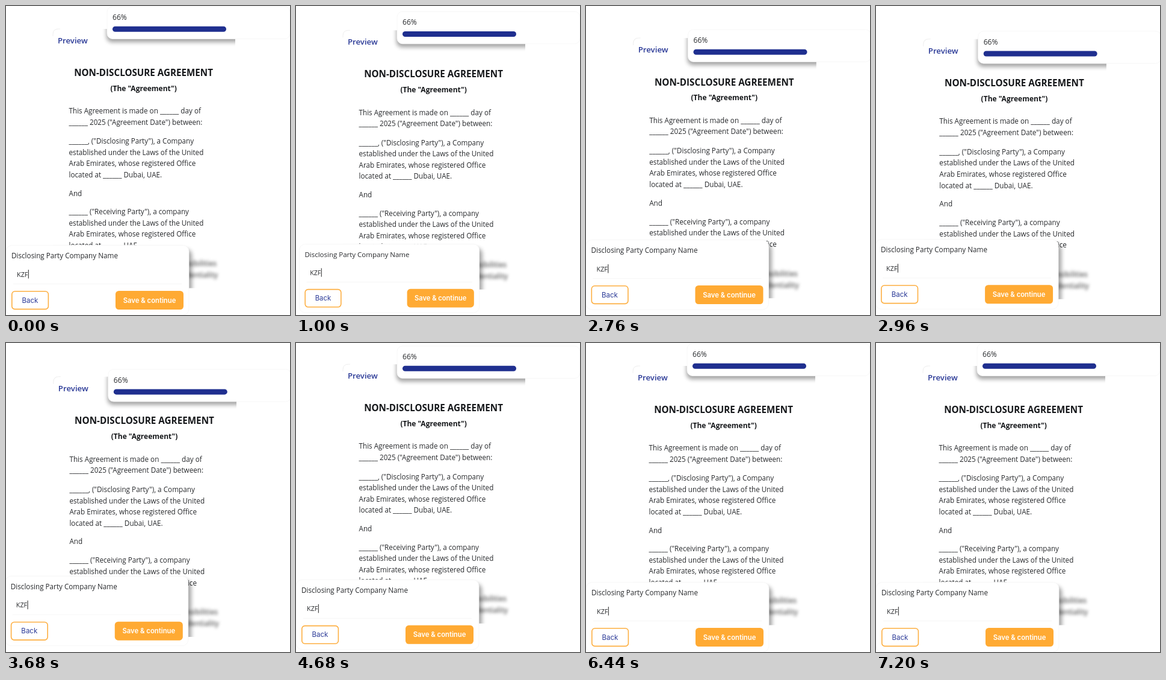
Recreate the animation shown at these times as an HTML page. Size 472 px wide and 512 px high, loop 7240 ms.

```html
<!DOCTYPE html>
<html lang="en">
<head>
<meta charset="utf-8">
<title>Agreement preview</title>
<style>
  html, body { margin: 0; width: 100%; height: 100%; overflow: hidden; background: #fff; }
  svg { display: block; width: 100vw; height: 100vh; }
  text { font: 11.7px "Open Sans", "Noto Sans", sans-serif; fill: #282a2d; white-space: pre; }
  .title { font-size: 15.2px; font-weight: 700; fill: #16181b; text-anchor: middle; }
  .subtitle { font-size: 12px; font-weight: 700; fill: #16181b; text-anchor: middle; }
  .heading { font-size: 13.2px; font-weight: 600; fill: #2b3a97; }
  .percent { font-size: 12.1px; }
  .button { font: 400 11.5px Inter, sans-serif; fill: #2b3a97; text-anchor: middle; }
  .primary { font-size: 11.3px; font-weight: 600; fill: #fff; }
  .blurred { filter: blur(2.8px); font-weight: 600; fill: #5c5c5c; text-anchor: end; }
  .shadow { fill: #000; opacity: .36; filter: blur(3.8px); }
  .card { fill: #fff; stroke: #f5f5f5; stroke-width: .8; }
</style>
</head>
<body>
<svg viewBox="0 0 472 512">
  <clipPath id="page"><rect class="doc" x="78" y="38" width="303" height="429.5"/></clipPath>

  <g class="doc">
    <path d="M78 50V47Q78 38 87 38H90" fill="none" stroke="#eee"/>
    <text class="heading" x="86" y="62.2">Preview</text>
    <text class="title" x="228.6" y="116.2">NON-DISCLOSURE AGREEMENT</text>
    <text class="subtitle" x="228.6" y="141">(The "Agreement")</text>
    <g id="lines"></g>
    <text class="blurred" x="350" y="431">The Parties accept the following responsibilities</text>
    <text class="blurred" x="352" y="450">and shall at all times preserve confidentiality</text>
  </g>

  <g clip-path="url(#page)">
    <g class="bar"><rect class="shadow" x="167" y="6" width="304" height="54" rx="9"/></g>
    <g class="dialog"><rect class="shadow" x="4" y="403" width="305" height="116" rx="10"/></g>
  </g>

  <g class="bar">
    <rect class="card" x="168" y="1" width="304" height="53.5" rx="9"/>
    <text class="percent" x="177" y="23">66%</text>
    <rect x="177" y="33.8" width="189" height="9" rx="4.5" fill="#1f2f8f"/>
  </g>

  <g class="dialog">
    <rect class="card" y="396.5" width="304" height="115.5" rx="10"/>
    <text x="9" y="418">Disclosing Party Company Name</text>
    <path d="M12 460.5H292" stroke="#f6f6f6"/>
    <text x="18" y="448.5" style="font-size:10.8px">KZF</text>
    <path d="M37.3 437V451.5" stroke="#222"/>
    <rect x="9.8" y="472.8" width="60.6" height="29.6" rx="5" fill="#fff" stroke="#fdaf42" stroke-width="1.6"/>
    <text class="button" x="40" y="491.6">Back</text>
    <rect x="182" y="472" width="113" height="31" rx="5.5" fill="#ffaa33"/>
    <text class="button primary" x="238.5" y="491.6">Save &amp; continue</text>
  </g>
</svg>
<script>
const LOOP = 7240, TICK = 40;

const paragraphs = [
  [178.3, "This Agreement is made on ______ day of", "______ 2025 (\"Agreement Date\") between:"],
  [228.4, "______, (\"Disclosing Party\"), a Company", "established under the Laws of the United",
    "Arab Emirates, whose registered Office", "located at ______ Dubai, UAE."],
  [314.5, "And"],
  [345.4, "______ (\"Receiving Party\"), a company", "established under the Laws of the United",
    "Arab Emirates, whose registered Office", "located at ______ UAE."]
];
const holder = document.getElementById("lines");
for (const [top, ...lines] of paragraphs) {
  lines.forEach((line, i) => {
    const text = document.createElementNS("http://www.w3.org/2000/svg", "text");
    text.setAttribute("x", 104.5);
    text.setAttribute("y", top + i * 18.5);
    text.textContent = line;
    holder.append(text);
  });
}

// doc x, y, scale; bar x, y; dialog x, y, scale
const rest = [0, 0, 1, 0, 0, 0, 0, 1];
const nudged = [0, 2.3, 1, 0, 8.2, 5.4, -2.2, .984];
const dropping = [.6, 15, 1.004, 1.5, 38, -.5, -9, 1];
const dropped = [.8, 17.8, 1.004, 1.8, 42.6, -1.2, -10.3, 1];
const raised = [0, -2.8, 1, 0, 4, 0, -4.2, 1];

const linear = p => p;
const easeOut = p => 1 - (1 - p) ** 2;

// end time, pose reached, easing on the way there
const keys = [
  [0, rest], [800, rest], [1000, nudged, easeOut], [2600, nudged],
  [2760, dropping, linear], [3320, dropped, easeOut], [4440, dropped],
  [4680, raised, easeOut], [6240, raised], [6440, rest, easeOut], [LOOP, rest]
];

function poseAt(time) {
  const i = keys.findIndex(([end]) => time < end);
  const [start, from] = keys[i - 1];
  const [end, to, ease = linear] = keys[i];
  const p = ease((time - start) / (end - start));
  return from.map((v, k) => v + (to[k] - v) * p);
}

const parts = name => [...document.querySelectorAll("." + name)];
const docs = parts("doc"), bars = parts("bar"), dialogs = parts("dialog");

// moves the nodes by x, y and scales them about the point ox, oy
function place(nodes, x, y, scale = 1, ox = 0, oy = 0) {
  const value = `translate(${ox + x} ${oy + y}) scale(${scale}) translate(${-ox} ${-oy})`;
  nodes.forEach(n => n.setAttribute("transform", value));
}

function draw() {
  const time = Math.floor(performance.now() % LOOP / TICK) * TICK;
  const [docX, docY, docScale, barX, barY, x, y, scale] = poseAt(time);
  place(docs, docX, docY, docScale, 78, 38);
  place(bars, barX, barY);
  place(dialogs, x, y, scale, 9, 414);
  requestAnimationFrame(draw);
}
draw();
</script>
</body>
</html>
```
